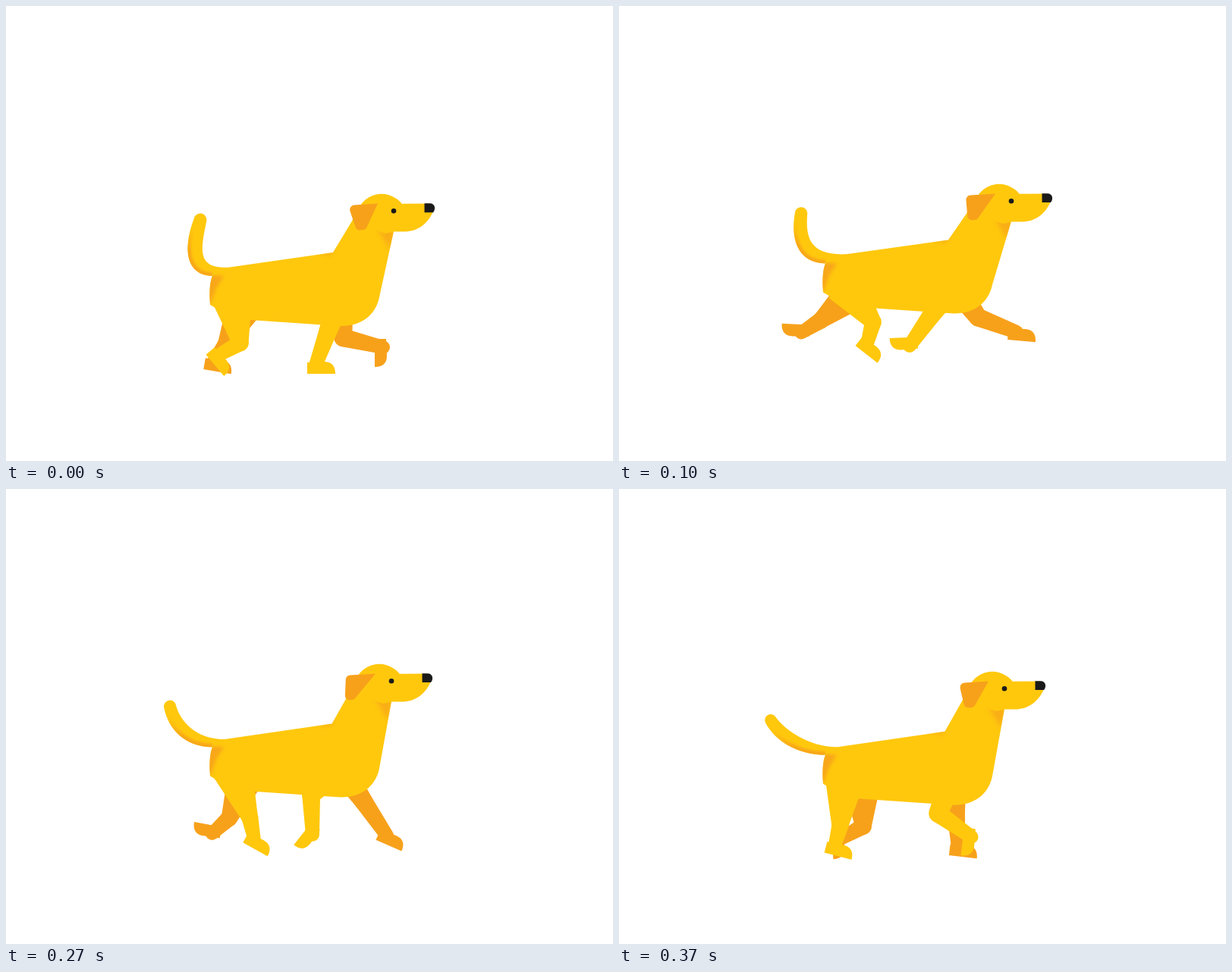
Recreate the animation shown at these times as an HTML page with a canvas. Size 800 px wide and 600 px high, loop 0.4 s.

```html
<!DOCTYPE html>
<html lang="en">
<head>
<meta charset="utf-8">
<title>Trotting dog</title>
<style>
  html, body { margin: 0; width: 100%; height: 100%; overflow: hidden; background: #fff; }
  canvas { display: block; }
</style>
</head>
<body>
<canvas id="stage" width="800" height="600"></canvas>
<script>
const ctx = document.getElementById('stage').getContext('2d');
const YELLOW = '#ffc80d', ORANGE = '#f7a11b', BLACK = '#1a1a1a';
const LOOP = 400, STRIDE = 16;   // the loop shows 8 steps of a 16-step stride

// Each leg has a hip, half-widths (hip, knee, ankle), the knee's place along the leg,
// a knee bend, and the stride of its ankle: x, y and foot angle at every second step.
const FRONT = {
  hip: [441, 383], widths: [17, 12, 9], knee: 0.5, farShift: 0,
  bend: step => 34 * Math.max(0, wave(step - 7.2)),
  stride: [[408,474,0], [383,448,178], [386,447,162], [430,463,117],
           [497,450,90], [524,430,5], [510,446,17], [486,467,26]]
};
const HIND = {
  hip: [298, 385], widths: [27, 11, 8.5], knee: 0.7, farShift: 22,
  bend: step => -25 * Math.max(0.12, wave(step)),
  stride: [[279,461,50], [327,446,38], [331,456,32], [315,467,28],
           [251,470,10], [218,431,183], [236,448,177], [263,459,195]]
};

function wave(step) {
  return Math.cos(step / STRIDE * 2 * Math.PI);
}

// Smooth closed path for the ankle; the foot flicks round with an ease-out.
function ankleAt(stride, step) {
  const key = Math.floor(step / 2), mix = step / 2 - key;
  const [p, a, b, n] = [-1, 0, 1, 2].map(i => stride[(key + i + 8) % 8]);
  const spline = i => a[i] + mix / 2 * (b[i] - p[i]
    + mix * (2 * p[i] - 5 * a[i] + 4 * b[i] - n[i] + mix * (3 * (a[i] - b[i]) + n[i] - p[i])));
  const eased = 1 - (1 - mix) ** 2;
  return [spline(0), spline(1), a[2] + (b[2] - a[2]) * eased];
}

function fill(path, color) {
  ctx.fillStyle = color;
  ctx.fill(path);
}

function polygon(...coords) {
  const path = new Path2D();
  for (let i = 0; i < coords.length; i += 2) path.lineTo(coords[i], coords[i + 1]);
  path.closePath();
  return path;
}

function disc(x, y, radius) {
  const path = new Path2D();
  path.arc(x, y, radius, 0, Math.PI * 2);
  return path;
}

// Soft orange shade that stays inside a shape.
function shade(shape, draw, blur, alpha) {
  ctx.save();
  ctx.clip(shape);
  ctx.filter = `blur(${blur}px)`;
  ctx.globalAlpha = alpha;
  ctx.fillStyle = ORANGE;
  draw();
  ctx.restore();
}

// Tapered bone with a round far end.
function drawBone(x1, y1, x2, y2, half1, half2, color) {
  const length = Math.hypot(x2 - x1, y2 - y1);
  const nx = (y1 - y2) / length, ny = (x2 - x1) / length;
  fill(polygon(
    x1 + nx * half1, y1 + ny * half1, x2 + nx * half2, y2 + ny * half2,
    x2 - nx * half2, y2 - ny * half2, x1 - nx * half1, y1 - ny * half1), color);
  fill(disc(x2, y2, half2), color);
}

function drawFoot(x, y, degrees, color) {
  const foot = new Path2D('M-11-4V11H26Q26-5 11-5Z');
  ctx.save();
  ctx.translate(x, y);
  ctx.rotate(degrees * Math.PI / 180);
  fill(foot, color);
  ctx.restore();
}

// Far legs run half a stride apart from the near ones.
function drawLeg(leg, step, bodyY, isFar) {
  const phase = isFar ? step + STRIDE / 2 : step;
  const color = isFar ? ORANGE : YELLOW;
  const [ankleX, ankleY, footAngle] = ankleAt(leg.stride, phase);
  const [hipHalf, kneeHalf, ankleHalf] = leg.widths;
  const hipX = leg.hip[0], hipY = leg.hip[1] + bodyY;
  const dx = ankleX - hipX, dy = ankleY - hipY;
  const bend = leg.bend(phase) / Math.hypot(dx, dy);
  const kneeX = hipX + dx * leg.knee - dy * bend;
  const kneeY = hipY + dy * leg.knee + dx * bend;

  ctx.save();
  ctx.translate(isFar ? leg.farShift : 0, 0);
  drawBone(hipX, hipY, kneeX, kneeY, hipHalf, kneeHalf, color);
  drawBone(kneeX, kneeY, ankleX, ankleY, kneeHalf, ankleHalf, color);
  drawFoot(ankleX, ankleY, footAngle, color);
  ctx.restore();
}

// The tail drops back evenly while its root stays on the rump.
function drawTail(step, y, backX, backY) {
  const tipX = 256 - 8 * step, tipY = 282 + 4 * step + y;
  const tilt = (8 - 4.8 * step) * Math.PI / 180;
  const radius = 8.5 - step * 0.1;
  const outer = new Path2D();
  outer.moveTo(272, 356 + y);
  outer.bezierCurveTo(235, 355 + y, 234 - 4 * step, 317 + 3 * step + y,
    tipX - radius * Math.cos(tilt), tipY - radius * Math.sin(tilt));
  const tail = new Path2D(outer);
  tail.arc(tipX, tipY, radius, tilt + Math.PI, tilt + 2 * Math.PI);
  tail.bezierCurveTo(256 - 5.3 * step, 323 + y, 252, 346 + y, backX, backY);
  tail.lineTo(backX, backY + 14);
  tail.closePath();
  fill(tail, YELLOW);

  shade(tail, () => {
    const fade = ctx.createLinearGradient(tipX, tipY, 272, 356 + y);
    fade.addColorStop(0.1, 'rgba(247,161,27,0)');
    fade.addColorStop(0.5, ORANGE);
    ctx.strokeStyle = fade;
    ctx.lineWidth = 9;
    ctx.stroke(outer);
  }, 1.5, 0.85);
}

function drawBody(headX, headY, y, backX, backY) {
  const napeX = 431 + headX / 2;
  const body = new Path2D();
  body.moveTo(272, 356 + y);
  body.lineTo(backX, backY);
  body.lineTo(napeX, 325 + y);
  body.lineTo(469 + headX, 262 + headY);
  body.lineTo(511 + headX, 297 + headY);
  body.lineTo(492, 384 + y);
  body.bezierCurveTo(487, 408 + y, 468, 422 + y, 442, 422 + y);
  body.lineTo(410, 420 + y);
  body.lineTo(300, 412.5 + y);
  body.lineTo(269, 394 + y);
  body.quadraticCurveTo(267, 368 + y, 272, 356 + y);
  fill(body, YELLOW);

  const rump = polygon(266, 354 + y, 287, 356 + y, 277, 372 + y, 270, 392 + y, 264, 392 + y);
  const throat = polygon(490 + headX, 294 + headY, 513 + headX, 296 + headY, 506 + headX, 322 + headY);
  const nape = polygon(napeX - 22, 326 + y, napeX + 4, 320 + y, napeX - 4, 330 + y);
  shade(body, () => ctx.fill(rump), 2, 0.85);
  shade(body, () => ctx.fill(throat), 3, 0.7);
  shade(body, () => ctx.fill(nape), 2, 0.45);
}

function drawHead(x, y, ear) {
  ctx.save();
  ctx.translate(x, y);

  const head = new Path2D();
  head.moveTo(456, 284);
  head.lineTo(468.5, 261);
  head.arc(495, 281.5, 33.7, Math.PI * 1.21, Math.PI * 1.79);
  head.lineTo(558, 260.5);
  head.lineTo(563, 271);
  head.bezierCurveTo(555, 289, 541, 297.5, 525, 297.5);
  head.lineTo(511, 297.5);
  head.lineTo(500, 300);
  head.closePath();
  fill(head, YELLOW);

  const nose = new Path2D();
  nose.moveTo(551.5, 260.3);
  nose.lineTo(559, 260.3);
  nose.bezierCurveTo(565, 260.3, 567, 267, 563, 272.2);
  nose.lineTo(551.5, 272.2);
  fill(nose, BLACK);
  fill(disc(511, 270.3, 3.3), BLACK);

  const flap = new Path2D();
  flap.moveTo(490, 260.5);
  flap.arcTo(451, 263, 462 + ear, 296, 6);
  flap.arcTo(462 + ear, 296, 474 + ear, 295, 6);
  flap.arcTo(474 + ear, 295, 490, 260.5, 5);
  flap.closePath();
  fill(flap, ORANGE);

  ctx.restore();
}

function draw(time) {
  // Two steps every 100 ms, held for 70 and 30 ms.
  const step = 2 * Math.floor(time / 100) + (time % 100 >= 70 ? 1 : 0);
  const lift = Math.sin(step * Math.PI / 8);
  const sway = Math.sin(step * Math.PI / 4);
  const headX = 12 / Math.PI * Math.asin(sway);
  const headY = -18.5 * lift;
  const bodyY = -19 * lift - 3 * sway;
  const backX = 293 + 7 * sway;
  const backY = 345 - (backX - 291) / 7 + bodyY;

  ctx.fillStyle = '#fff';
  ctx.fillRect(0, 0, 800, 600);
  for (const isFar of [true, false]) {
    drawLeg(HIND, step, bodyY, isFar);
    drawLeg(FRONT, step, bodyY, isFar);
  }
  drawTail(step, bodyY, backX, backY);
  drawBody(headX, headY, bodyY, backX, backY);
  drawHead(headX, headY, -14 * lift ** 1.5);
}

const begin = performance.now();
function tick() {
  draw((performance.now() - begin) % LOOP);
  requestAnimationFrame(tick);
}
tick();
</script>
</body>
</html>
```
